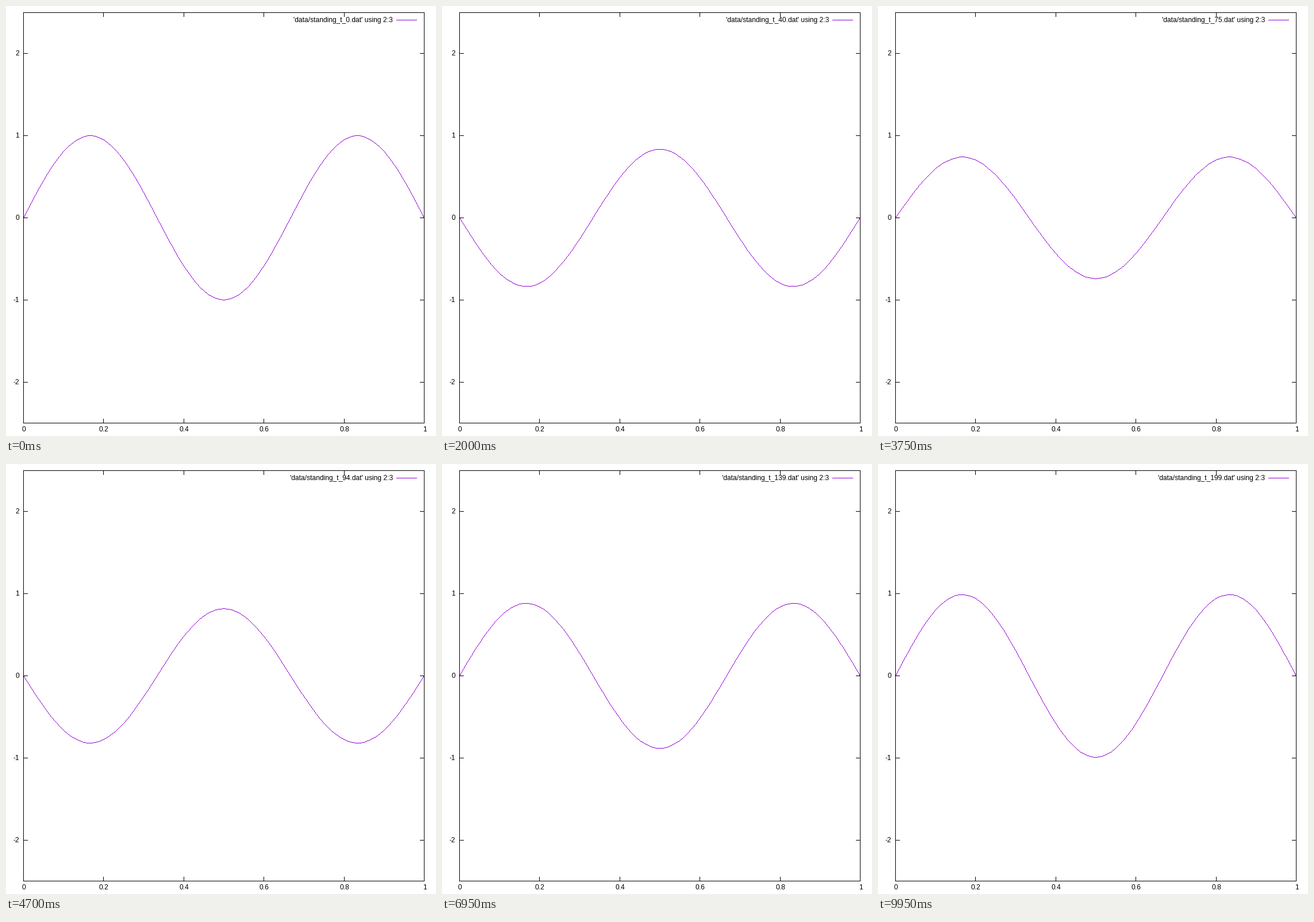
Recreate the animation shown at these times as a matplotlib script. Size 748 by 748 pixels, loop 10000 ms.

```python
import numpy as np
import matplotlib.pyplot as plt
from matplotlib.animation import FuncAnimation

SIZE = 748
DPI = 88                    # 8.5 in * 88 = 748 px exactly
PX = 72 / DPI               # one pixel in points
LEFT, RIGHT, TOP, BOTTOM = 30, 727, 11, 725
TICK = 8
FRAMES, INTERVAL = 200, 50
CELLS = 100
VIOLET = (148, 0, 211, 255)

plt.rcParams["font.family"] = "Liberation Sans"
plt.rcParams["font.size"] = 12 * PX

fig = plt.figure(figsize=(SIZE / DPI, SIZE / DPI), dpi=DPI, facecolor="white")
ax = fig.add_axes([0, 0, 1, 1])
ax.set_xlim(0, SIZE)
ax.set_ylim(SIZE, 0)
ax.axis("off")


def to_col(x):
    return np.rint(LEFT + x * (RIGHT - LEFT)).astype(int)


def to_row(y):
    return np.rint(BOTTOM - (y + 2.5) / 5 * (BOTTOM - TOP)).astype(int)


def segment(xs, ys, color="black"):
    ax.plot(xs, ys, color=color, lw=PX, antialiased=False, snap=False,
            solid_capstyle="butt")


def hline(x0, x1, row, color="black"):
    segment([x0, x1 + 1], [row + 0.5] * 2, color)


def vline(col, y0, y1):
    segment([col + 0.5] * 2, [y0, y1 + 1])


def draw_frame():
    for row in (TOP, BOTTOM):
        hline(LEFT, RIGHT, row)
    for col in (LEFT, RIGHT):
        vline(col, TOP, BOTTOM)

    for value in range(-2, 3):
        row = to_row(value)
        hline(LEFT, LEFT + TICK - 1, row)
        hline(RIGHT - TICK + 1, RIGHT, row)
        ax.text(23, row + 4, str(value).replace("\u2212", "-"),
                ha="right", va="baseline")

    for i in range(6):
        col = to_col(i / 5)
        vline(col, TOP, TOP + TICK - 1)
        vline(col, BOTTOM - TICK + 1, BOTTOM)
        ax.text(col + 1, 740, f"{i / 5:g}", ha="center", va="baseline")


def amplitude(n):
    """Leapfrog standing wave whose first two time levels are equal."""
    w = 3 * np.pi / CELLS
    return np.cos(w * (n - 0.5)) / np.cos(w / 2)


def trace(cols, rows):
    """Pixels of a one-pixel polyline without smoothing."""
    xs, ys = [], []
    for x0, x1, y0, y1 in zip(cols, cols[1:], rows, rows[1:]):
        steps = max(abs(x1 - x0), abs(y1 - y0)) + 1
        xs.append(np.linspace(x0, x1, steps))
        ys.append(np.linspace(y0, y1, steps))
    return (np.rint(np.concatenate(xs)).astype(int),
            np.rint(np.concatenate(ys)).astype(int))


grid = np.linspace(0, 1, CELLS + 1)
mode = np.sin(3 * np.pi * grid)
grid_cols = to_col(grid)

draw_frame()
hline(679, 714, 24, "#9400d3")
label = ax.text(673, 28, "", ha="right", va="baseline")
blank = np.zeros((SIZE, SIZE, 4), np.uint8)
curve = fig.figimage(blank, origin="upper", zorder=-1)
ax.patch.set_visible(False)


def update(n):
    cols, rows = trace(grid_cols, to_row(amplitude(n) * mode))
    pixels = blank.copy()
    pixels[rows, cols] = VIOLET
    curve.set_data(pixels)
    label.set_text(f"'data/standing_t_{n}.dat' using 2:3")
    return curve, label


anim = FuncAnimation(fig, update, frames=FRAMES, interval=INTERVAL,
                     repeat=True, repeat_delay=0)
plt.show()
```
